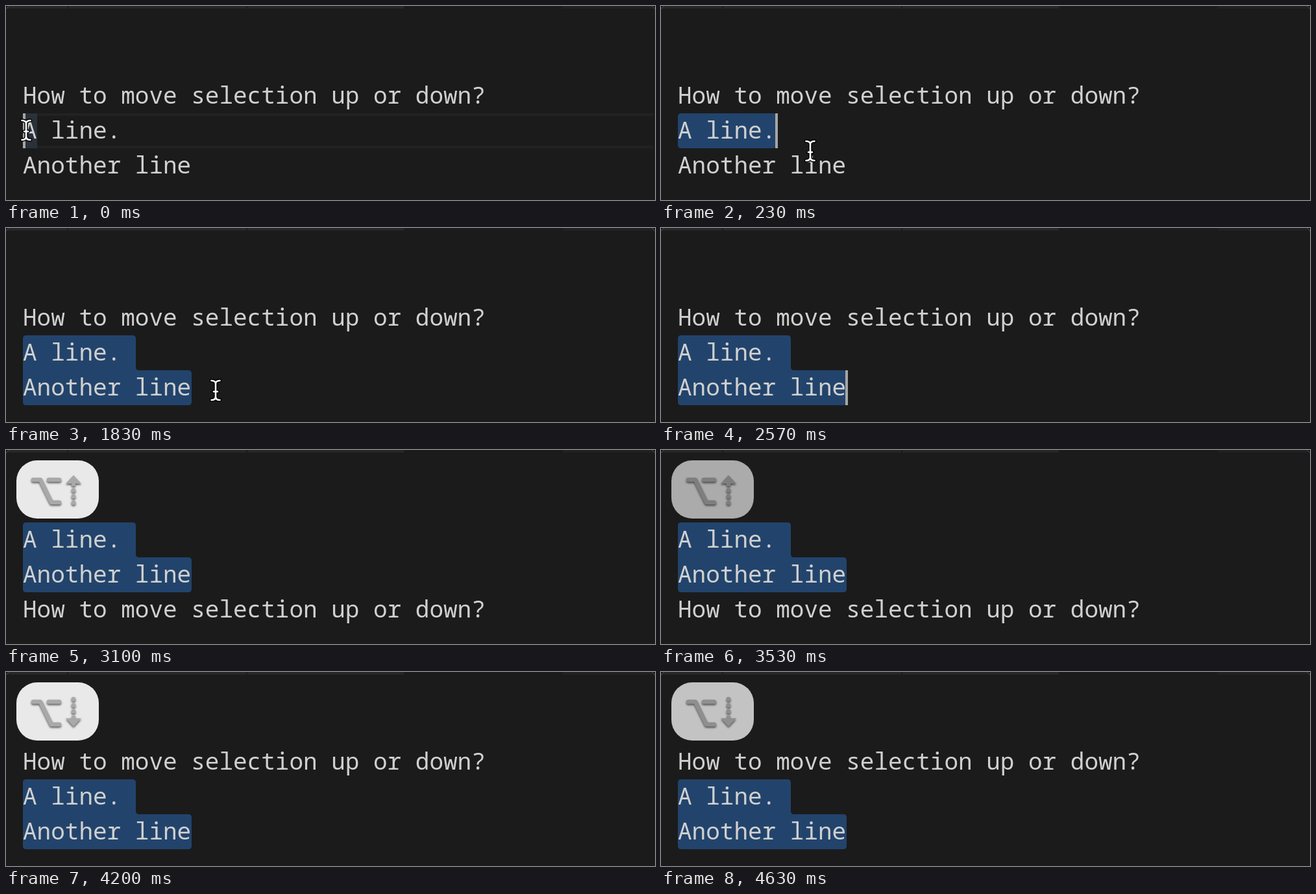
These frames come from a looping animation (1000 px wide and 300 px high, 4.66 s). An HTML page:

```html
<!DOCTYPE html>
<html lang="en">
<head>
<meta charset="utf-8">
<title>Moving a selection up and down</title>
<style>
  html, body { margin: 0; width: 100%; height: 100%; overflow: hidden; background: #1b1b1b; }
  svg { display: block; width: 1000px; height: 300px; }
  text { font: 400 36px "Noto Sans Mono", "DejaVu Sans Mono", monospace; fill: #d0d0d0; white-space: pre; }
  #sel { fill: #22446c; }
  #caret { fill: #a6a6a6; }
  .glyph { fill: none; stroke: #a9a9a9; stroke-width: 6.5; stroke-linecap: round; stroke-linejoin: round; }
  .solid { fill: #a9a9a9; }
  .keys { filter: drop-shadow(0 2px 1.5px rgba(0, 0, 0, .6)); }
  .beam { fill: none; stroke-linecap: round; stroke-linejoin: round; }
</style>
</head>
<body>
<svg viewBox="0 0 1000 300">
  <rect width="1000" height="300" fill="#1b1b1b"/>
  <g id="tabs">
    <rect width="613" height="4" fill="#272727"/>
    <rect x="858" width="142" height="4" fill="#212121"/>
    <rect x="94" width="2" height="4" fill="#1a1a1a"/>
    <rect x="370" width="2" height="4" fill="#1a1a1a"/>
    <path d="M0 0H5Q1 1 0 5ZM1000 0H995Q999 1 1000 5Z" fill="#0c0c0c"/>
    <path d="M0 5Q1 1 5 0M1000 5Q999 1 995 0" fill="none" stroke="#4a4a4a"/>
  </g>

  <g id="active">
    <path d="M30 166H997V170H30ZM30 216H997V220H30Z" fill="#222"/>
    <rect x="26" y="166" width="22" height="54" fill="#2b3139"/>
  </g>

  <text id="question" x="26" y="151">How to move selection up or down?</text>
  <g id="block">
    <path id="sel"/>
    <text x="26" y="205">A line.</text>
    <text x="26" y="259">Another line</text>
    <rect id="caret" width="4" height="54"/>
  </g>

  <g id="badge">
    <rect x="16" y="16" width="127" height="90" rx="32" fill="#e9e9e9"/>
    <g class="keys">
      <path class="glyph" d="M42 46H53L70 81H82M66 46H82"/>
      <g id="arrow" class="solid">
        <path d="M104 39L116 52H92Z"/>
        <rect x="101" y="50" width="6" height="6"/>
        <circle cx="104" cy="62.5" r="3.4"/>
        <circle cx="104" cy="72" r="3.4"/>
        <circle cx="104" cy="81.5" r="3.4"/>
      </g>
    </g>
  </g>

  <g id="pointer">
    <path class="beam" id="rim" stroke="#000" stroke-width="5.5"/>
    <path class="beam" id="core" stroke="#fff" stroke-width="2.6"/>
  </g>
</svg>
<script>
const LOOP = 4660, LEFT = 26, CHAR = 21.6, ROW = 54, TOP = 166;
const $ = id => document.getElementById(id);

const beam = "M-6.5-15Q0-15 0-10V10Q0 15-6.5 15M6.5-15Q0-15 0-10M0 10Q0 15 6.5 15M-3 2H3";
$("rim").setAttribute("d", beam);
$("core").setAttribute("d", beam);

// time, x, y of the drag
const drag = [
  [0, 31, 192], [30, 32, 193], [70, 52, 195], [100, 85, 199], [130, 122, 204],
  [170, 172, 212], [200, 203, 218], [230, 230, 224], [270, 258, 232],
  [300, 277, 238], [330, 291, 242], [430, 315, 249], [530, 323, 251]
];
const caretOff = [[830, 1330], [1830, 2330], [3100, 3600], [4200, LOOP]];
const presses = [{ at: 2600, up: true }, { at: 3730, up: false }];

function dragAt(t) {
  if (t <= 0) return drag[0].slice(1);
  const i = drag.findIndex(p => p[0] > t);
  if (i < 0) return drag[drag.length - 1].slice(1);
  const [a, b] = [drag[i - 1], drag[i]];
  const k = (t - a[0]) / (b[0] - a[0]);
  return [a[1] + (b[1] - a[1]) * k, a[2] + (b[2] - a[2]) * k];
}

// The text caret trails the pointer by one tick.
function caretAt(t) {
  const [x, y] = dragAt(t - 30);
  const row = y < 220 ? 0 : 1;
  const col = Math.round((x - LEFT) / CHAR);
  return { row, col: Math.max(0, Math.min(row ? 12 : 7, col)) };
}

function selection({ row, col }) {
  if (!row && !col) return "";
  const end = LEFT + Math.round(col * CHAR) + row;
  const r = 5, mid = TOP + ROW, right = row ? 200 : end;
  const bottom = mid + row * ROW;
  let d = `M${LEFT + r} ${TOP}H${right - r}q${r} 0 ${r} ${r}V${mid - r}`;
  if (row) d += `q0 ${r} ${r} ${r}H${end - r}q${r} 0 ${r} ${r}V${bottom - r}`;
  return d + `q0 ${r} ${-r} ${r}H${LEFT + r}q${-r} 0 ${-r} ${-r}V${TOP + r}q0 ${-r} ${r} ${-r}Z`;
}

function tick(t) {
  return Math.round(Math.floor((t + 3.4) * 0.03) * 10 / 3) * 10;
}

function show(id, on) {
  $(id).style.display = on ? "" : "none";
}

function draw(now) {
  const t = tick(now);
  const caret = caretAt(t);
  const [px, py] = dragAt(t);
  const moved = t >= presses[0].at && t < presses[1].at;

  show("active", !caret.row && !caret.col);
  $("sel").setAttribute("d", selection(caret));
  $("caret").setAttribute("x", 2 * Math.floor((LEFT + caret.col * CHAR) / 2));
  $("caret").setAttribute("y", TOP + caret.row * ROW);
  show("caret", !caretOff.some(([a, b]) => t >= a && t < b));
  $("block").setAttribute("transform", `translate(0 ${moved ? -ROW : 0})`);
  $("question").setAttribute("y", moved ? 259 : 151);

  $("pointer").setAttribute("transform", `translate(${px} ${py})`);
  show("pointer", t < 2570);

  const press = presses.filter(p => t >= p.at).pop();
  show("badge", !!press);
  if (press) {
    const fade = (t - press.at - 900) / 200;
    const alpha = fade < 0 ? 1 : Math.max(t < press.at + 1130 ? 0.02 : 0, 0.82 * (1 - fade));
    $("badge").setAttribute("opacity", alpha);
    $("arrow").setAttribute("transform", press.up ? "" : "translate(0 123.5) scale(1 -1)");
  }
}

const start = performance.now();
function frame() {
  draw((performance.now() - start) % LOOP);
  requestAnimationFrame(frame);
}
frame();
</script>
</body>
</html>
```
